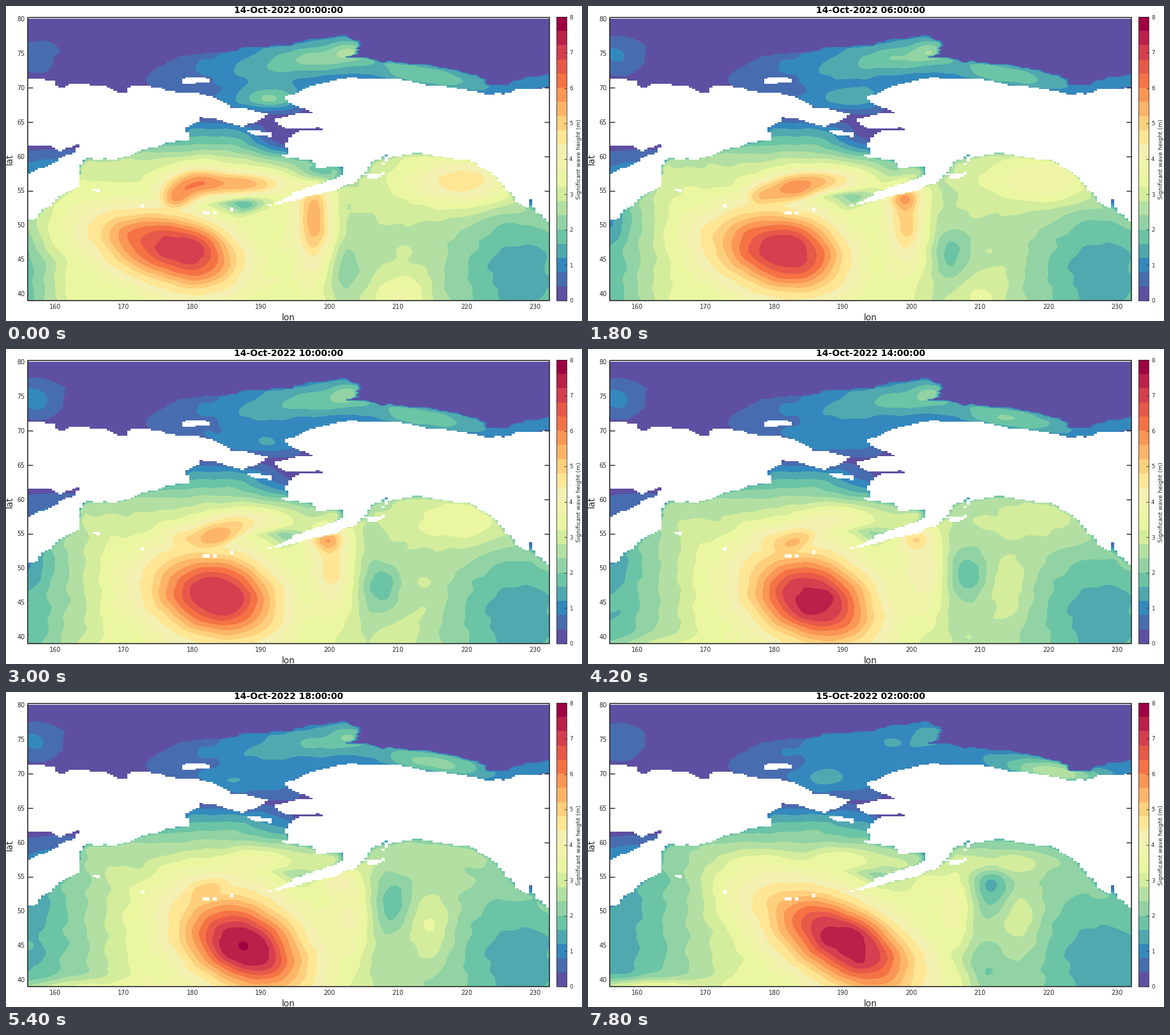
These frames come from a looping animation (902 px wide and 494 px high, 8000 ms). A matplotlib script:

```python
import numpy as np
import matplotlib
import matplotlib.pyplot as plt
from matplotlib.animation import FuncAnimation
from matplotlib.path import Path

W, H = 902, 494
LEFT, RIGHT, TOP, BOTTOM = 34, 850.5, 20.5, 462
COLS, ROWS = 152, 164
STEPS, LAST_HOUR = 14, 26
INK = "#262626"
rng = np.random.default_rng(4)

plt.rcParams["font.family"] = "DejaVu Sans"
fig = plt.figure(figsize=(W / 100, H / 100), dpi=100, facecolor="white")
ax = fig.add_axes([0, 0, 1, 1])
ax.set(xlim=(0, W), ylim=(H, 0))
ax.set_autoscale_on(False)
ax.axis("off")

colors = matplotlib.colormaps["Spectral_r"](np.linspace(0, 1, 20))[:, :3]
colors[9:11] = np.array([(240, 244, 168), (243, 240, 178)]) / 255

# Coasts as a few key points, roughened below
SIBERIA = [
    (30, 115), (79, 119), (80, 130), (160, 127), (168, 134), (187, 138), (187, 128), (240, 129),
    (297, 136), (345, 152), (352, 161), (409, 170), (400, 179), (372, 189), (330, 178), (301, 174),
    (300, 182), (279, 190), (288, 211), (218, 225), (185, 238), (125, 238), (114, 253), (113, 284),
    (98, 291), (55, 322), (46, 335), (30, 336)]
OKHOTSK = [(30, 232), (37, 220), (68, 220), (85, 228), (112, 218), (119, 209), (108, 230),
           (75, 246), (30, 267)]
ALASKA = [
    (436, 143), (470, 130), (500, 121), (545, 113), (660, 125), (757, 139), (800, 131), (860, 126),
    (860, 341), (847, 338), (828, 320), (816, 292), (820, 321), (797, 308), (794, 296), (757, 261),
    (722, 240), (640, 231), (600, 239), (589, 251), (597, 231), (571, 246), (550, 275), (510, 290),
    (470, 298), (411, 313), (440, 300), (500, 276), (531, 263), (527, 253), (488, 254), (482, 244),
    (446, 239), (438, 216), (453, 199), (495, 195), (492, 189), (435, 192), (419, 178), (485, 167),
    (452, 156)]
ISLANDS = [
    [(275, 118), (285, 111), (318, 114), (320, 118), (314, 121), (278, 122)],
    [(378, 195), (413, 198), (413, 205), (387, 203)],
    [(428, 235), (447, 232), (447, 239)],
    [(561, 264), (592, 261), (588, 269), (568, 271)],
    [(137, 286), (148, 288), (148, 293), (140, 293)]]
ISLETS = [(215, 313), (314, 325), (326, 325), (353, 320)]
ICE = [
    (30, 10), (30, 38), (100, 52), (92, 85), (85, 106), (100, 117), (185, 120), (240, 95), (290, 77),
    (400, 64), (480, 52), (530, 46), (553, 58), (550, 76), (535, 80), (590, 88), (660, 93),
    (757, 117), (742, 124), (785, 124), (860, 106), (860, 10)]


def rough(points, depth=2, amount=.07):
    """Closed outline with randomly displaced midpoints."""
    p = np.array(points, float)
    for _ in range(depth):
        step = np.roll(p, -1, axis=0) - p
        normal = step[:, ::-1] * [1, -1]
        mid = p + step / 2 + normal * rng.uniform(-amount, amount, (len(p), 1))
        p = np.stack([p, mid], axis=1).reshape(-1, 2)
    return p


def inside(points, x, y):
    return Path(points).contains_points(np.c_[x.ravel(), y.ravel()]).reshape(x.shape)


siberia, okhotsk, alaska = rough(SIBERIA), rough(OKHOTSK), rough(ALASKA)


def is_land(x, y):
    land = inside(siberia, x, y) & ~inside(okhotsk, x, y)
    for shape in [alaska] + ISLANDS:
        land |= inside(shape, x, y)
    for ix, iy in ISLETS:
        land |= (abs(x - ix) < 4) & (abs(y - iy) < 3)
    return land


def blur(mask, radius):
    """Gaussian blur measured in grid cells, wider across rows than columns."""
    out = mask.astype(float)
    for axis, r in ((0, 2 * radius), (1, radius)):
        n = int(3 * r) + 1
        k = np.exp(-.5 * (np.arange(-n, n + 1) / r) ** 2)
        pad = [(n, n) if a == axis else (0, 0) for a in (0, 1)]
        out = np.apply_along_axis(np.convolve, axis, np.pad(out, pad, mode="edge"),
                                  k / k.sum(), mode="valid")
    return out


gx, gy = np.meshgrid(np.linspace(LEFT, RIGHT, COLS + 1), np.linspace(TOP, BOTTOM, ROWS + 1))
ice = inside(rough(ICE), gx + rng.uniform(-6, 6, (ROWS + 1, 1)), gy)
ice_fade = np.clip(1.9 - 2.4 * blur(ice, .9), 0, 1) * ~ice
shelter = 1 - np.clip(1.6 * (blur(is_land(gx, gy), 1.6) - .37), 0, .9)
in_okhotsk = inside(okhotsk, gx, gy + 0) | (inside(siberia, gx, gy) & (gy < 275))
ripple = [np.sin(gx / a + 2 * np.sin(gy / b)) * np.sin(gy / c + np.sin(gx / a / 2))
          for a, b, c in ((10, 17, 9), (27, 31, 15))]


def key(hour, values):
    """Blend of values spread evenly over the whole span."""
    return np.interp(hour, np.linspace(0, LAST_HOUR, len(values)), values)


def swell(xs, ys, peaks, w, h, slope=0):
    """Moving Gaussian hill (or hollow) as a function of the hour."""
    def height(hour):
        dx, dy = gx - key(hour, xs), gy - key(hour, ys)
        return key(hour, peaks) * np.exp(-(dx / w) ** 2 - ((dy - slope * dx) / h) ** 2)
    return height


ARCTIC = [
    swell((40,), (78,), (.5, .9, .8, .7), 55, 30),
    swell((490, 500), (82, 76), (1.25, 1, .8, .3), 110, 24, -.12),
    swell((535,), (72,), (.6, .6, .5, .3), 28, 16),
    swell((415,), (145,), (1.2, .4, 0, 0), 45, 18),
    swell((660, 655, 665, 730), (110, 108, 110, 126), (1.1, 1, 1.3, 1.8), 80, 18, .15),
    swell((340, 340, 340, 370), (138, 138, 138, 133), (0, 0, .4, .6), 35, 13),
]
OCEAN = [
    # Bering ridge: head, eastern arm and western tail
    swell((295, 328, 320, 325), (277, 293, 310, 315), (2.2, 2.4, 2.1, 1.1), 48, 27, -.1),
    swell((375, 385, 390), (278, 264, 263), (2.1, 1.3, 1.1, 1), 65, 20),
    swell((265,), (303, 285), (1.6, 1, .4, 0), 26, 20),
    # Lee of the island chain
    swell((350, 395, 405, 405), (317, 304, 301, 301), (-2.6, -2.4, -2.1, -1.8), 52, 13, -.2),
    # North-eastern shallows
    swell((445,), (208,), (-1.8, -1.2, -.7, -.4), 55, 35),
    swell((490,), (262,), (-1.6, -.4, .3, .2), 35, 18),
    # Front ahead of the storm
    swell((484, 510, 538, 575), (338, 335, 352, 348), (2, 1.5, 1, .9), 28, 68, .05),
    swell((486, 496, 512, 530), (305, 299, 296, 298), (.3, 1.8, .9, .4), 26, 17),
    swell((530, 585, 603, 632), (412, 380, 330, 305), (-.7, -.9, -.9, -1), 30, 40),
    # Gulf and south-east
    swell((715,), (275, 262), (2, 1.1, -.1, -.3), 95, 42),
    swell((655,), (268,), (0, 0, .1, 1), 70, 17),
    swell((640, 675), (400, 355), (.1, .2, .8, .7), 35, 60),
    swell((622, 612), (458, 435), (1, .4, 0, -.5), 45, 40),
    swell((805,), (420,), (-1.4, -1.35, -1.25, -1.2), 108, 105),
    # Western edge
    swell((36,), (342,), (-.7, -.5, -.3, -.2), 28, 28),
    swell((80,), (464,), (0, 0, 1.1, 1.9), 95, 14),
]


def storm(hour):
    """Lopsided, sheared ellipse whose unit contour is the 6 m line."""
    cx, cy = key(hour, (278, 326, 371, 408)), key(hour, (381, 385, 402, 392))
    peak = key(hour, (7.1, 7.15, 7.65, 7.5))
    left, right = key(hour, (85, 71, 68, 85)), key(hour, (54, 58, 65, 70))
    up, down = key(hour, (32, 42, 54, 42)), key(hour, (40, 45, 45, 50))
    dx = gx - cx
    dy = gy - cy - key(hour, (.2, .1, .25, .4)) * dx
    u = np.hypot(dx / np.where(dx < 0, left, right), dy / np.where(dy < 0, up, down))
    return np.interp(u, [0, .57, 1, 1.5, 2, 2.5, 4],
                     [peak, 6 + .75 * (peak - 6), 6, 4.8, 4, 3.2, 0])


def arctic(hour):
    z = np.interp(gx, [180, 260, 370], [.1, .6, .9]) + sum(s(hour) for s in ARCTIC)
    return z * np.interp(gy, [150, 172], [1, .45])


def ocean(hour):
    calm = key(hour, (1, .84))
    south = np.interp(gy, [175, 195, 215, 240, 285, 330],
                      [.4, 1.3, 1.9, 2.8 * calm, 3.3 * calm, 3.5])
    west = np.interp(gx, [key(hour, (36, 60)), key(hour, (110, 265))],
                     [key(hour, (1.8, 1.4)), 3.5])
    east = np.interp(gx, [key(hour, (480, 500)), key(hour, (530, 620))],
                     [3.5, key(hour, (2.75, 2.5))])
    z = np.minimum(np.minimum(south, west), east) + sum(s(hour) for s in OCEAN)
    return np.logaddexp(6 * z, 6 * storm(hour)) / 6


def wave_height(hour):
    z = np.where(gy < 170, arctic(hour), ocean(hour))
    z = (z + .05 * ripple[0] + .07 * ripple[1]) * shelter * ice_fade
    bay = np.interp(gy, [222, 258], [.3, key(hour, (1, .7, 1))]) + .15 * ripple[1]
    return np.clip(np.where(in_okhotsk & (gx < 125), bay, z), .001, 7.99)


def label(x, y, text, px, **kw):
    return ax.text(x, y, text, fontsize=px * .72, **{"color": INK, "ha": "center", **kw})


def line(xs, ys, width=1.4):
    ax.plot(xs, ys, color=INK, lw=width * .72, zorder=5, solid_capstyle="butt")


def draw_land():
    cx, cy = (gx[:-1, :-1] + gx[1:, 1:]) / 2, (gy[:-1, :-1] + gy[1:, 1:]) / 2
    image = np.ones((ROWS, COLS, 4))
    image[..., 3] = is_land(cx, cy)
    ax.imshow(image, extent=(LEFT, RIGHT, BOTTOM, TOP), aspect="auto",
              interpolation="nearest", zorder=3)


def draw_axes():
    top, right = 18.5, 851
    line([LEFT, right, right, LEFT, LEFT], [top, top, BOTTOM, BOTTOM, top], 1.6)
    for lon in range(160, 231, 10):
        label(LEFT + (lon - 156) * 10.737, 475, str(lon), 9.6)
    for lat in range(40, 81, 5):
        y = BOTTOM - (lat - 39) * 10.76
        label(30, y + 3.5, str(lat), 9.6, ha="right")
        # The water hides the tick marks, bare land does not
        for edge, turn in ((LEFT, 1), (right, -1)):
            if is_land(np.array([edge + 3 * turn]), np.array([y]))[0]:
                line([edge, edge + 8 * turn], [y, y])
    label(442.5, 493, "lon", 13.8)
    label(6, 240, "lat", 13.8, rotation=90, va="center")


def draw_colorbar():
    x0, x1, top = 861.5, 877.5, 17.5
    ax.imshow(colors[::-1, None], extent=(x0, x1, BOTTOM, top), aspect="auto",
              interpolation="nearest", zorder=3)
    line([x0, x1, x1, x0, x0], [top, top, BOTTOM, BOTTOM, top], .8)
    for value in range(9):
        y = BOTTOM - value * (BOTTOM - top) / 8
        line([x1 - 4, x1], [y, y], .8)
        label(882, y + 3.2, str(value), 8.7, ha="left")
    label(897, 240, "Significant wave height (m)", 9, rotation=90, va="center")


def make_scene(step):
    hour = 2 * step
    waves = ax.contourf(gx, gy, wave_height(hour), levels=np.arange(21) * .4,
                        colors=[tuple(c) for c in colors], zorder=1)
    stamp = f"{14 + hour // 24}-Oct-2022 {hour % 24:02d}:00:00"
    title = label(442.5, 11, stamp, 14, weight="bold", color="black")
    return waves, title


draw_land()
draw_axes()
draw_colorbar()
scenes = [make_scene(step) for step in range(STEPS)]


def update(frame):
    for step, scene in enumerate(scenes):
        for artist in scene:
            artist.set_visible(step == frame // 3)


anim = FuncAnimation(fig, update, frames=40, interval=200, repeat=True, repeat_delay=0)
plt.show()
```
